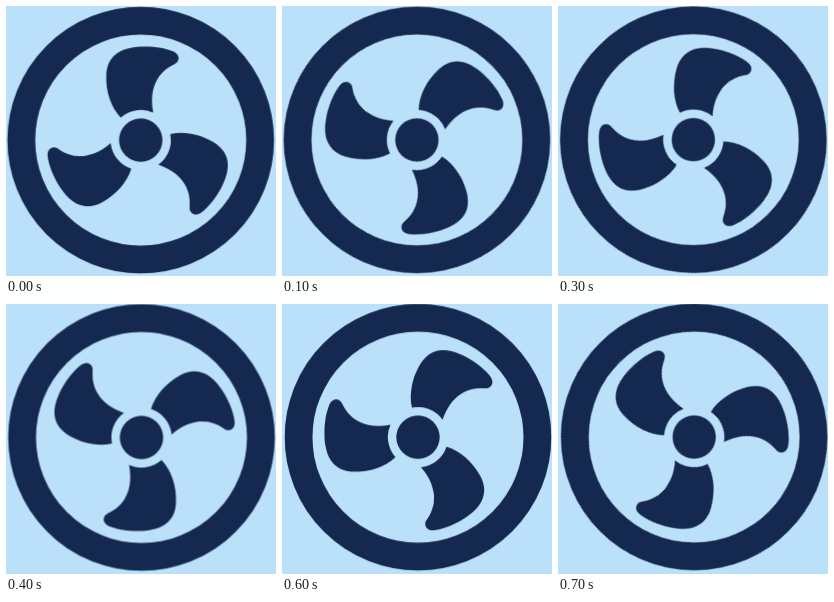
Animation, 270 px wide and 270 px high, one loop 800 ms. Source, as an HTML page:

```html
<!DOCTYPE html>
<html lang="en">
<head>
<meta charset="utf-8">
<title>Fan</title>
<style>
  html, body { margin: 0; width: 100%; height: 100%; overflow: hidden; background: #bbe1fa; }
  svg { display: block; width: 100%; height: 100%; }
  .fan { fill: #152850; animation: spin 800ms steps(8, end) infinite; }
  .ring { fill: none; stroke: #152850; stroke-width: 27.8; }
  /* One clockwise turn in eighths, while the hub drifts slightly. */
  @keyframes spin {
    from { transform: translate(134.7px, 134.1px) rotate(0deg); }
    to { transform: translate(136.4px, 132.9px) rotate(360deg); }
  }
</style>
</head>
<body>
<svg viewBox="0 0 270 270">
  <defs>
    <path id="blade" d="M-20-22.5C-30-33-35-49-34.5-64C-34-84-21-92.5 0-93.5C13-94 25-92 33-88.5C40-85 39-78 33-75.5C17-68 8-52 12.5-27.5A30.2 30.2 0 0 0-20-22.5Z"/>
  </defs>
  <g class="fan">
    <circle class="ring" r="119.4"/>
    <circle r="21.7"/>
    <use href="#blade"/>
    <use href="#blade" transform="rotate(120)"/>
    <use href="#blade" transform="rotate(240)"/>
  </g>
</svg>
</body>
</html>
```
